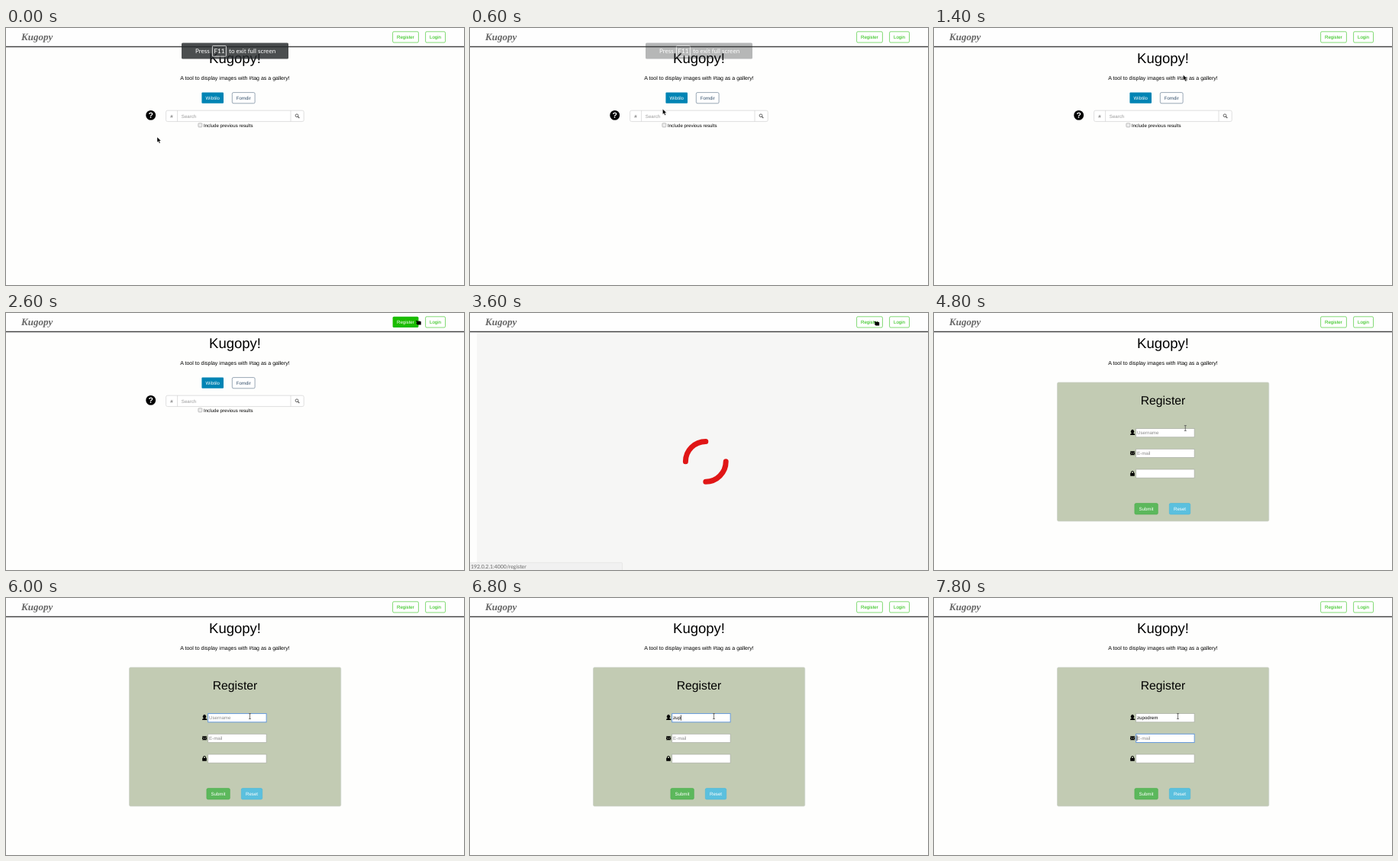
Recreate the animation shown at these times as an HTML page. Size 600x337 px, loop 8000 ms.

```html
<!DOCTYPE html>
<html lang="en">
<head>
<meta charset="utf-8">
<title>Gallery sign-up</title>
<style>
html, body { margin: 0; width: 100%; height: 100%; overflow: hidden; background: #fefefd; }
svg { display: block; width: 600px; height: 337px; }
text { font: 6.15px "Liberation Sans", Arial, sans-serif; text-rendering: geometricPrecision; white-space: pre; }
.mid { text-anchor: middle; }
.brand { font: italic bold 13px "Liberation Serif", serif; fill: #666; }
.title { font-size: 18.5px; }
.sub { font-size: 7.03px; }
.head { font-size: 15.7px; }
.lato text { font: 8.1px Lato, sans-serif; fill: #fff; }
.line { fill: #fff; stroke: #ccc; stroke-width: .6; }
.hint { fill: #8a8a8a; }
.green rect { fill: #fff; stroke: #1abc00; stroke-width: .55; }
.green text { fill: #1abc00; }
.green.hover rect { fill: #1abc00; stroke: none; }
.green.hover text, .white { fill: #fff; }
.field { fill: #fff; stroke: #a9ada4; stroke-width: .7; }
.field.focus { stroke: #5b93dc; stroke-width: .9; }
</style>
</head>
<body>
<svg viewBox="0 0 600 337">
  <rect width="600" height="337" fill="#fefefd"/>

  <g id="intro">
    <text class="title mid" x="300" y="45.8">Kugopy!</text>
    <text class="sub mid" x="300" y="68.2">A tool to display images with #tag as a gallery!</text>
  </g>

  <g id="search">
    <rect x="256.4" y="84.6" width="28.6" height="14.2" rx="1" fill="#0084b4"/>
    <text class="mid white" x="270.8" y="93.9">Wibtilo</text>
    <rect x="296.3" y="84.6" width="29.8" height="14.2" rx="1.7" fill="#fff" stroke="#35506c" stroke-width=".5"/>
    <text class="mid" x="311.2" y="93.9" fill="#35506c">Fomdir</text>
    <circle cx="189.7" cy="114.4" r="6.4"/>
    <text class="mid white" x="189.7" y="118.2" style="font-size:10.5px;font-weight:bold">?</text>
    <rect class="line" x="209.6" y="108.2" width="180.6" height="14.4" rx="2"/>
    <path class="line" d="M224.6 108.2v14.4M373 108.2v14.4"/>
    <text class="mid" x="217" y="117.6" fill="#555">#</text>
    <text x="229.8" y="117.6" fill="#999">Search</text>
    <g fill="none" stroke="#444" stroke-width=".8">
      <circle cx="381" cy="114.8" r="1.9"/>
      <path d="M382.4 116.2l1.9 1.9" stroke-width="1.1"/>
    </g>
    <rect x="251.9" y="124.9" width="5" height="5" rx=".8" fill="#eee" stroke="#999" stroke-width=".6"/>
    <text x="259" y="130.2">Include previous results</text>
  </g>

  <g id="form">
    <rect x="161.5" y="91" width="277.2" height="182" rx="1.7" fill="#c2cbb3" stroke="#c9cec6" stroke-width=".7"/>
    <text class="head mid" x="300" y="119.9">Register</text>
    <path d="M257 160q0-2 2-2.6a2.1 2.3 0 1 1 2 0q2.4 .6 2.4 2.6z"/>
    <rect x="257" y="181.3" width="6.2" height="5" rx=".5"/>
    <path d="M257 182l3.1 2.3 3.1-2.3M257 186l2-2M263.2 186l-2-2" fill="none" stroke="#c2cbb3" stroke-width=".5"/>
    <rect x="257.2" y="209.8" width="5.6" height="4" rx=".5"/>
    <path d="M258.4 210v-1a1.6 1.6 0 0 1 3.2 0v1" fill="none" stroke="#000"/>
    <rect id="userBox" class="field" x="264.7" y="151.6" width="76.4" height="11.2"/>
    <rect id="mailBox" class="field" x="264.7" y="178.3" width="76.4" height="11.2"/>
    <rect class="field" x="264.7" y="205" width="76.4" height="11.2"/>
    <text id="user" x="266" y="159.2"></text>
    <text class="hint" x="266" y="186">E-mail</text>
    <rect id="caret" width=".7" height="7.2"/>
    <rect x="262.9" y="249.6" width="30.4" height="14.4" rx="1.7" fill="#5cb85c" stroke="#4cae4c" stroke-width=".6"/>
    <text class="mid white" x="278" y="259">Submit</text>
    <rect x="308.3" y="249.6" width="27.4" height="14.4" rx="1.7" fill="#5bc0de" stroke="#46b8da" stroke-width=".6"/>
    <text class="mid white" x="322" y="259">Reset</text>
  </g>

  <g id="loader">
    <rect x="9" y="25" width="591" height="312" fill="#f6f6f5"/>
    <path id="spinner" d="M282.4 194.8A26.4 26.4 0 0 1 308.8 168.4M335.2 194.8A26.4 26.4 0 0 1 308.8 221.2"
      fill="none" stroke="#e01616" stroke-width="7" stroke-linecap="round"/>
  </g>

  <rect width="600" height="24" fill="#fefefe"/>
  <rect y="23.8" width="600" height="1.2" fill="#444"/>
  <rect y="25" width="600" height="1" fill="#999" opacity=".5"/>
  <text class="brand" x="20" y="16">Kugopy</text>
  <g id="register" class="green">
    <rect x="506.6" y="4.8" width="33.8" height="14.2" rx="1.5"/>
    <text class="mid" x="523.4" y="14">Register</text>
  </g>
  <g class="green">
    <rect x="549.6" y="4.8" width="25.9" height="14.2" rx="1.5"/>
    <text class="mid" x="562.5" y="14">Login</text>
  </g>

  <g id="banner" class="lato">
    <rect x="230" y="19.5" width="140" height="21" rx="1.5" fill="#24282a" opacity=".82"/>
    <rect x="270.4" y="23.4" width="18" height="13.8" rx="1" fill="none" stroke="#fff" stroke-width=".8"/>
    <text x="248" y="33">Press</text>
    <text class="mid" x="279.4" y="33">F11</text>
    <text x="292" y="33">to exit full screen</text>
  </g>

  <g id="status" class="lato">
    <rect x="-1" y="327.3" width="200.5" height="11" rx="1" fill="#f1f1f1" stroke="#ddd" stroke-width=".6"/>
    <text x="1" y="334.7" style="font-size:6.95px;fill:#666">192.0.2.1:4000/register</text>
  </g>

  <g id="pointer">
    <path id="arrow" d="M0 0v7l1.6-1.4 1.2 2.6 1.3-.6-1.2-2.5h2.2z" stroke="#fff" stroke-width=".4"/>
    <path id="hand" d="M0 1.2q.6-.9 1.5 0l1 .6q2-.6 4.2 .4v4.2h-4.7l-1.8-2.2q.6-.6 1.4-.2z"/>
    <path id="beam" d="M-1.5-3.4h3M0-3.4v6.8M-1.5 3.4h3" fill="none" stroke="#555" stroke-width=".8"/>
  </g>
</svg>

<script>
const LOOP = 8000, STEP = 200, NAME = "zupodrem";
const el = id => document.getElementById(id);
const show = (id, on) => el(id).style.display = on ? "" : "none";

// pointer path: time, x, y
const path = [
  [0, 198, 143], [200, 198, 143], [1200, 334, 51], [1400, 326.5, 61.5], [1600, 326.5, 61.5],
  [2000, 320, 62], [2200, 320, 62], [2600, 537, 9], [2800, 529.5, 10], [3800, 529.5, 10],
  [4600, 339, 147], [5000, 319.5, 155], [LOOP, 319.5, 155]
];

function pointerAt(t) {
  const i = path.findIndex(p => p[0] > t);
  const [t0, x0, y0] = path[i - 1], [t1, x1, y1] = path[i];
  const k = (t - t0) / (t1 - t0);
  return [x0 + (x1 - x0) * k, y0 + (y1 - y0) * k];
}

function draw(t) {
  const loading = t >= 3200 && t < 3800, form = t >= 3800;
  show("search", !form);
  show("form", form);
  show("loader", loading);
  el("spinner").setAttribute("transform", `rotate(${(t - 3600) * 0.3} 308.8 194.8)`);

  el("banner").style.opacity = Math.max(0, 1 - t / 1000);
  show("status", t >= 2800 && t < 4000);
  el("register").classList.toggle("hover", t >= 2600 && t < 3200);

  const hand = t >= 2600 && t < 4000, beam = t >= 4800;
  show("hand", hand);
  show("beam", beam);
  show("arrow", !hand && !beam);
  el("pointer").setAttribute("transform", `translate(${pointerAt(t)})`);

  const typed = t < 6600 ? "" : NAME.slice(0, 1 + (t - 6600) / 100);
  const onMail = t >= 7800, user = el("user");
  user.textContent = typed || "Username";
  user.setAttribute("class", typed ? "" : "hint");
  el("userBox").classList.toggle("focus", t >= 5400 && !onMail);
  el("mailBox").classList.toggle("focus", onMail);

  show("caret", t >= 5400 && t < 6000 || t >= 6600);
  const end = typed && !onMail ? user.getComputedTextLength() : -0.4;
  el("caret").setAttribute("x", 266 + end);
  el("caret").setAttribute("y", onMail ? 180.2 : 153.5);
}

function tick(now) {
  draw(Math.floor(now % LOOP / STEP) * STEP);
  requestAnimationFrame(tick);
}
requestAnimationFrame(tick);
</script>
</body>
</html>
```
